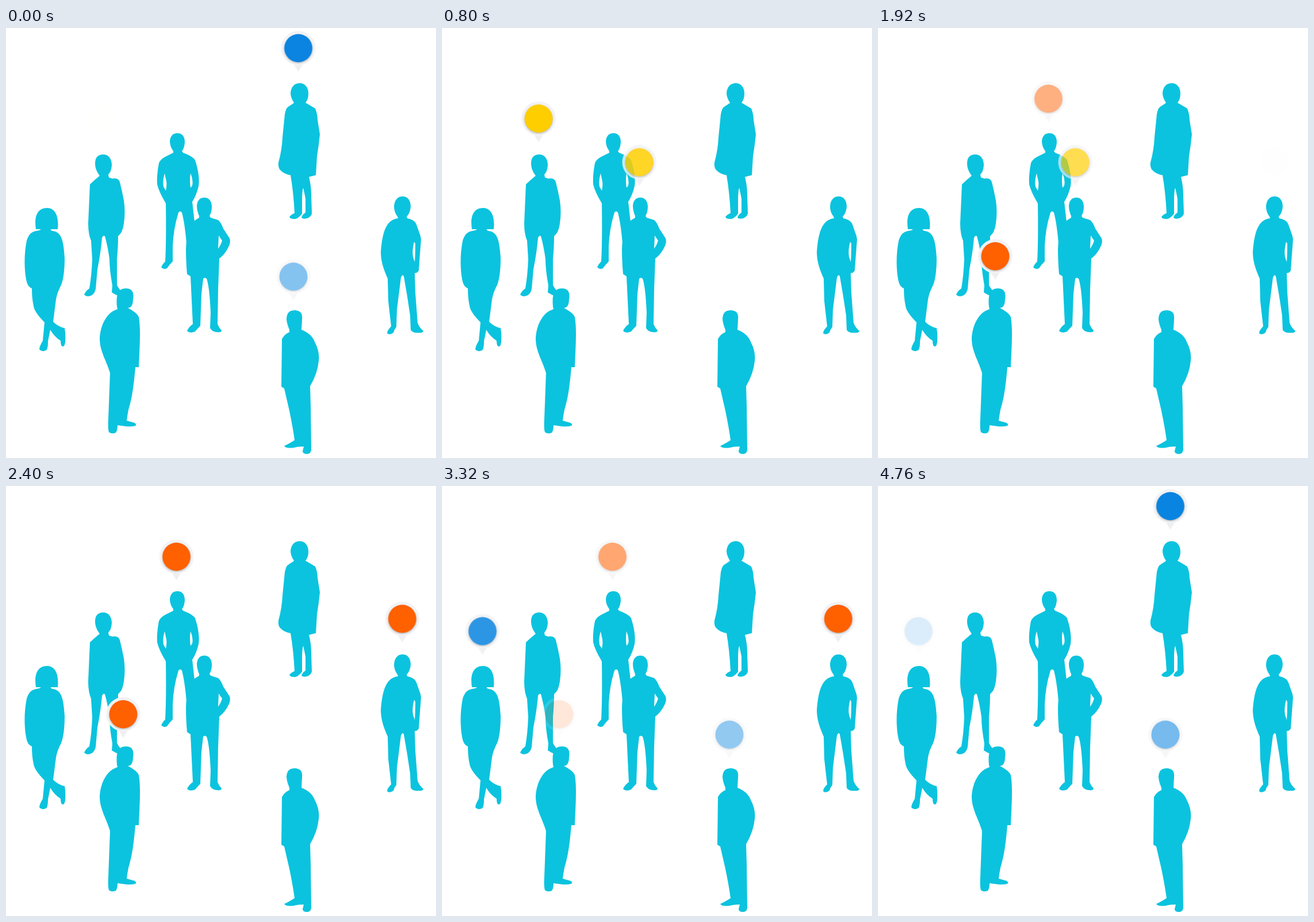
Write an HTML page that moves like this. It is 748 by 748 pixels and loops after 4.8 s.

```html
<!DOCTYPE html>
<html lang="en">
<head>
<meta charset="utf-8">
<title>Group with pins</title>
<style>
html, body { margin: 0; width: 100%; height: 100%; overflow: hidden; background: #fff; }
svg { display: block; width: 100%; height: 100%; }
.people { fill: #0bc3de; }
.gaps { fill: #fff; }
.pin { opacity: 0; animation: fade 4800ms calc(var(--start) - 4800ms) infinite cubic-bezier(.1, .35, .9, .65); }
.blue { color: #0984e0; }
.yellow { color: #ffce00; }
.orange { color: #ff6000; }

/* Every pin fades in, stays and fades out; only its start differs. */
@keyframes fade {
  0% { opacity: 0; }
  10%, 30% { opacity: 1; }
  40%, 100% { opacity: 0; }
}
</style>
</head>
<body>
<svg viewBox="0 0 748 748">
  <defs>
    <radialGradient id="shade">
      <stop offset=".88" stop-color="#777" stop-opacity=".4"/>
      <stop offset="1" stop-color="#777" stop-opacity="0"/>
    </radialGradient>
    <g id="pin">
      <path d="M-8 28H8L0 41Z" fill="#efeff1"/>
      <circle r="29.8" fill="#f2f2f4"/>
      <circle cy="1.3" r="26.5" fill="url(#shade)"/>
      <circle r="24.4" fill="currentColor"/>
    </g>
  </defs>

  <g class="people">
    <!-- Woman with crossed legs -->
    <path d="M52 350C49 330 53 313 72 313C87 314 92 329 90 350L78 350Q77 352 81 353C97 355 100 370 102 400C102 420 100 437 96 447Q89 460 87 472L82 511Q91 520 102 522Q104 533 103 546Q102 554 99 554Q95 554 95 544Q84 537 77 525L73 545Q73 560 69 561Q62 564 58 559Q58 554 64 544L67 512Q50 495 48 484Q45 470 45 453Q37 450 35 437C31 415 32 390 36 370C41 355 47 354 58 352L61 350Z"/>
    <!-- Man with a bag shoulder -->
    <path d="M163 257Q155 247 155 236C155 225 160 220 169 220C179 220 184 228 184 239Q183 250 178 255L179 260L185 262Q195 260 198 268Q202 284 205 300Q208 320 205 340Q203 356 195 362Q195 380 193 402L193 447Q196 454 203 460L198 467Q190 464 184 460L185 448Q180 420 180 402Q177 380 172 362Q169 360 167 365Q165 390 159 420L156 454Q154 462 149 465Q141 469 136 464Q138 458 145 453Q149 430 150 402L148 370Q143 358 143 340L146 272Q153 265 163 257Z"/>
    <!-- Man with hands in pockets -->
    <path d="M291 214Q285 206 285 197C286 187 291 183 298 183C307 183 311 189 311 199Q310 210 306 214L308 217Q325 223 329 230C334 245 337 262 335 275Q331 292 324 302L328 338L314 375Q311 340 306 321Q303 317 300 321Q291 350 290 380L290 406Q284 412 280 418Q274 421 270 416Q272 411 277 406Q279 370 278 305Q266 285 263 272Q262 255 266 235Q268 229 277 224L291 217Z"/>
    <!-- Man with a hand on the hip -->
    <path d="M336 327Q332 318 332 309C333 299 338 295 345 295C353 295 358 301 358 311Q358 320 354 327L356 330L369 334Q374 338 378 349L389 366Q391 372 388 379Q381 394 371 401L369 455L368 515Q370 521 375 526Q375 530 367 529Q359 529 355 522L356 495Q354 450 349 436Q346 433 343 436L340 462L338 518Q333 523 329 528Q320 532 315 527Q318 520 325 515L321 432L315 428Q313 405 313 385Q314 350 328 335L336 330Z"/>
    <!-- Woman in a coat -->
    <path d="M501 130Q495 121 495 113C496 102 502 96 511 96C520 96 526 103 526 114Q526 124 521 130L538 140Q542 150 542 160L546 185Q544 205 541 223L539 256L527 259Q531 275 531 290L532 323Q530 329 524 331Q517 333 514 330Q515 325 521 321L521 297Q518 281 517 278Q515 284 515 300L515 323Q510 330 504 332Q496 333 493 329Q495 325 502 322Q500 285 495 256Q483 254 476 246Q473 242 474 234Q480 212 481 190L485 150Q487 139 491 137L500 131Z"/>
    <!-- Stout man facing right -->
    <path d="M193 485C191 463 195 453 209 453C220 453 223 461 221 472Q221 482 216 486L212 487Q229 496 231 503C235 525 232 560 231 590L225 590C222 625 219 645 213 664Q211 674 210 683L224 687Q228 690 225 692Q217 694 209 693L194 691Q194 700 191 704Q184 707 179 703Q177 697 178 680L181 600C174 577 163 562 163 540C164 519 173 500 187 492L194 489Z"/>
    <!-- Man facing left -->
    <path d="M493 525Q488 513 488 505C489 494 494 491 503 491C513 492 516 497 515 507L514 525Q532 532 537 546Q546 563 544 579Q542 601 529 623L530 658L531 734Q530 741 524 741Q516 741 516 736L518 728Q508 728 501 730Q487 732 484 727Q491 724 502 717Q499 695 493 666L484 627L479 624L480 541Q485 532 493 529Z"/>
    <!-- Man on the right -->
    <path d="M681 328Q675 320 675 310C676 299 681 293 690 293C699 293 704 300 704 311Q703 322 697 328L698 331Q712 334 714 342L721 362L722 368Q720 393 718 422Q715 427 711 426L712 460L716 513Q719 521 726 527Q725 531 717 530Q707 531 704 525L703 500Q698 465 692 432Q690 427 687 434L680 490L679 520Q675 525 674 530Q667 535 663 531Q663 526 670 519L665 475L664 436C656 418 652 405 652 389C654 364 658 346 668 337Q674 332 682 331Z"/>
  </g>

  <g class="gaps">
    <path d="M276 253Q272 265 274 276L278 283Q280 275 279 267Z"/>
    <path d="M321 253Q319 265 321 278L324 274Q326 264 321 253Z"/>
    <path d="M370 361L376 370Q374 377 369 384Z"/>
    <path d="M710 372Q706 387 708 398L711 407Q712 394 712 375Z"/>
  </g>

  <g class="yellow">
    <use class="pin" href="#pin" x="168" y="157.5" style="--start: 0ms"/>
    <use class="pin" href="#pin" x="343.3" y="233.5" style="--start: 360ms"/>
  </g>
  <g class="orange">
    <use class="pin" href="#pin" x="204" y="397" style="--start: 1440ms"/>
    <use class="pin" href="#pin" x="296.5" y="123" style="--start: 1680ms"/>
    <use class="pin" href="#pin" x="689.3" y="231" style="--start: 1920ms"/>
  </g>
  <g class="blue">
    <use class="pin" href="#pin" x="70.5" y="252.5" style="--start: 2880ms"/>
    <use class="pin" href="#pin" x="500" y="432.5" style="--start: 3120ms"/>
    <use class="pin" href="#pin" x="508.5" y="35" style="--start: 3360ms"/>
  </g>
</svg>
</body>
</html>
```
